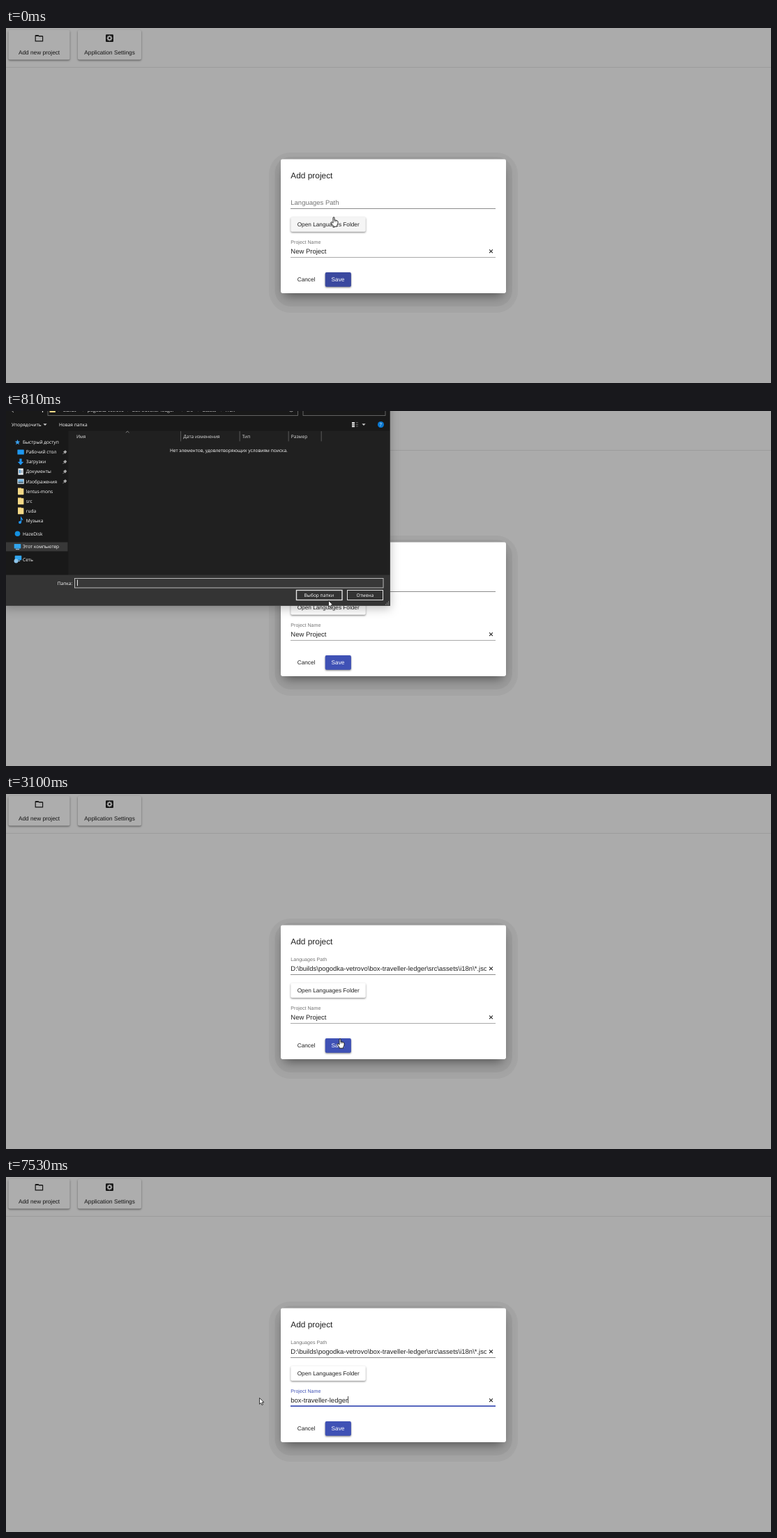
Recreate the animation shown at these times as an HTML page with a canvas. Size 1097 by 510 pixels, loop 8 s.

```html
<!DOCTYPE html>
<html lang="en">
<head>
<meta charset="utf-8">
<title>Add project</title>
<style>
html, body { margin: 0; width: 100%; height: 100%; overflow: hidden; background: #ababab; }
canvas { display: block; width: 1097px; height: 510px; }
</style>
</head>
<body>
<canvas id="stage" width="1097" height="510"></canvas>
<script>
const LOOP = 8000;
const SANS = '"Liberation Sans", Arial, sans-serif';
const UI = '"Open Sans", "Noto Sans", sans-serif';
const INK = '#212121', BLUE = '#3f51b5', GREY = '#757575';
const NAME = 'box-traveller-ledger';
const CRUMBS = ['builds', 'pogodka-vetrovo', NAME, 'src', 'assets', 'i18n'];
const PATH = 'D:\\' + CRUMBS.join('\\') + '\\*.json';

const stage = document.getElementById('stage').getContext('2d');
// The file picker is drawn apart so that it can fade and scale as one piece.
const WIN = { x: -3, y: -20, w: 554, h: 300, cx: 274, cy: 95 };
const layer = document.createElement('canvas');
layer.width = WIN.w;
layer.height = WIN.h;
const picker = layer.getContext('2d');
let g = stage;

// Step tracks: time first, then the values held from then on.
const POINTER = [
  [0, 'hand', 470, 272], [150, 'hand', 473, 274], [270, 'hand', 475, 275], [420, 'hand', 476, 276],
  [690, 'resize', 476, 282], [810, 'arrow', 462, 272], [960, 'arrow', 448, 262], [1080, 'arrow', 440, 258],
  [1200, 'arrow', 441, 260], [1350, 'arrow', 442, 262], [1470, 'arrow', 442, 263],
  [2560, 'arrow', 445, 268], [2710, 'hand', 453, 280], [2830, 'beam', 462, 318], [2980, 'hand', 479, 352],
  [3110, 'hand', 484, 355], [3260, 'hand', 482, 351], [3470, 'arrow', 470, 333],
  [3620, 'beam', 459, 321], [3740, 'beam', 440, 321], [3890, 'beam', 408, 320], [4040, 'arrow', 363, 317]
];
const WINDOW = [[0, 0, 1], [690, 0.61, 0.986], [810, 1, 1], [2140, 0.05, 0.955], [2560, 0, 1]];
const TYPED = [
  [0, 0], [4720, 1], [4870, 2], [5020, 4], [5300, 5], [5580, 7], [5730, 8], [6290, 9], [6440, 10],
  [6560, 12], [6710, 13], [6830, 14], [6980, 16], [7130, 17], [7410, 18], [7530, 20]
];
const SELECT = [[0, 459], [3740, 440], [3890, 408], [4720, 459]];

const at = (track, t) => track.filter(k => k[0] <= t).pop();

function rect(x, y, w, h, fill, r = 0) {
  g.fillStyle = fill;
  g.beginPath();
  g.roundRect(x, y, w, h, r);
  g.fill();
}

function frame(x, y, w, h, color, line = 1) {
  g.strokeStyle = color;
  g.lineWidth = line;
  g.strokeRect(x, y, w, h);
}

function dot(x, y, r, fill) {
  g.fillStyle = fill;
  g.beginPath();
  g.arc(x, y, r, 0, 7);
  g.fill();
}

function poly(points, fill, stroke, line = 1) {
  g.beginPath();
  points.forEach(([x, y], i) => i ? g.lineTo(x, y) : g.moveTo(x, y));
  if (fill) { g.closePath(); g.fillStyle = fill; g.fill(); }
  if (stroke) { g.strokeStyle = stroke; g.lineWidth = line; g.stroke(); }
}

// Text placed by its left edge and the middle of its capitals.
function text(s, x, y, size, fill = INK, font = SANS) {
  g.font = size + 'px ' + font;
  g.textRendering = 'geometricPrecision';
  g.fillStyle = fill;
  g.fillText(s, x, y + size * 0.36);
}

const label = (s, x, y, fill = '#fff') => text(s, x, y, 6.6, fill, UI);

function shadow(color, blur, dy) {
  g.shadowColor = color;
  g.shadowBlur = blur;
  g.shadowOffsetY = dy;
}

function raised(x, y, w, h, fill) {
  g.save();
  shadow('rgba(0,0,0,.45)', 2.5, 1.2);
  rect(x, y, w, h, fill, 2);
  g.restore();
}

function cross(x, y) {
  poly([[x - 2.4, y - 2.4], [x + 2.4, y + 2.4]], null, INK, 1.1);
  poly([[x + 2.4, y - 2.4], [x - 2.4, y + 2.4]], null, INK, 1.1);
}

function page() {
  rect(0, 0, 1097, 510, '#ababab');
  rect(0, 56, 1097, 1, '#9c9c9c');
  raised(3.5, 3, 88, 42.5, '#adadad');
  raised(103, 3, 91, 42.5, '#adadad');
  text('Add new project', 18, 35, 8.25, '#161616');
  text('Application Settings', 112.3, 35, 8.25, '#161616');

  poly([[42.2, 10.6], [46.2, 10.6], [47.4, 12], [52.6, 12], [52.6, 18.9], [42.2, 18.9], [42.2, 10.6]], null, '#161616', 1.2);
  poly([[42, 11.5], [52.6, 11.5]], null, '#161616', 1);

  rect(143, 9.2, 11, 10.8, '#161616', 1.3);
  for (let i = 0; i < 4; i++) {
    const a = i * Math.PI / 4, dx = 3.9 * Math.cos(a), dy = 3.9 * Math.sin(a);
    poly([[148.5 - dx, 14.6 - dy], [148.5 + dx, 14.6 + dy]], null, '#adadad', 1.5);
  }
  dot(148.5, 14.6, 3.1, '#adadad');
  dot(148.5, 14.6, 1.5, '#161616');
}

function projectName(t) {
  const focus = t >= 3620, count = at(TYPED, t)[1];
  text('Project Name', 408.3, 307, 7.12, focus ? BLUE : GREY);
  rect(408, focus ? 328.3 : 328.9, 294, focus ? 1.6 : 0.8, focus ? BLUE : '#8c8c8c');
  cross(695.5, 320.8);

  const value = count ? NAME.slice(0, count) : 'New Project';
  text(value, 408.3, 320.2, 9.5);
  const end = 408.3 + g.measureText(value).width;
  const from = at(SELECT, t)[1];
  if (from < 459) {
    g.save();
    g.beginPath();
    g.rect(from, 315, end - from, 10.5);
    g.clip();
    rect(from, 315, 60, 10.5, '#3390f5');
    text(value, 408.3, 320.2, 9.5, '#fff');
    g.restore();
  } else if (focus) {
    rect(end, 315, 0.9, 10, '#333');
  }
}

function dialog(t) {
  rect(377, 179, 357, 230, '#a4a4a4', 31);
  rect(385.5, 185, 340.5, 215, '#9c9c9c', 23);
  g.save();
  shadow('rgba(0,0,0,.5)', 16, 8);
  rect(399, 194, 313, 182, '#fff', 3);
  g.restore();
  rect(394, 188.5, 323, 192.5, '#fff', 2.4);
  text('Add project', 408.3, 212, 11.88);

  if (t >= 2140) {
    text('Languages Path', 408.3, 237.2, 7.12, GREY);
    g.save();
    g.beginPath();
    g.rect(408, 242, 281, 17);
    g.clip();
    text(PATH, 408.3, 250.3, 9.5);
    g.restore();
    cross(695.5, 250.8);
  } else {
    text('Languages Path', 408.3, 250.3, 9.5, GREY);
  }
  rect(408, 259, 294, 0.9, '#8c8c8c');

  raised(408.3, 271.5, 107.5, 21.3, t < 810 ? '#f5f5f5' : '#fff');
  text('Open Languages Folder', 417.7, 282.3, 8.25);
  projectName(t);

  text('Cancel', 417.7, 361.4, 8.25);
  raised(457.7, 351, 37.2, 20.8, t < 150 ? '#3a489f' : BLUE);
  text('Save', 466.6, 361.4, 8.25, '#fff');
}

function pin(x, y) {
  poly([[x - 3, y + 3], [x - 0.8, y + 0.8]], null, '#aaa', 0.8);
  poly([[x - 2.4, y - 0.6], [x + 0.6, y - 2.8], [x + 2.8, y - 0.6], [x + 0.4, y + 2.4]], '#aaa');
}

function folder(x, y) {
  rect(x - 4, y - 4.8, 5, 3, '#e3b95b');
  rect(x - 4, y - 4, 8.4, 9, '#f3d886', 0.6);
}

function screen(x, y) {
  rect(x - 4.8, y - 4, 9.6, 6.4, '#31a5ee', 0.6);
  rect(x - 2.6, y + 3, 5.2, 1.2, '#9fc8e4');
}

const ICONS = {
  desk: (x, y) => rect(x - 4.6, y - 3.6, 9.4, 7.2, '#1e98f0', 0.6),
  down: (x, y) => poly([[x - 1.6, y - 4.5], [x + 1.6, y - 4.5], [x + 1.6, y], [x + 4.2, y], [x, y + 4.6], [x - 4.2, y], [x - 1.6, y]], '#2196f3'),
  doc: (x, y) => {
    rect(x - 3.6, y - 4.6, 7.4, 9.2, '#e8eef2');
    rect(x - 2.2, y - 2.6, 2, 5, '#4b93c8');
    rect(x + 0.6, y - 2, 2, 4, '#9ab');
  },
  photo: (x, y) => {
    rect(x - 4.6, y - 3.6, 9.4, 7.2, '#dfe9ef');
    rect(x - 3.6, y - 2.6, 7.4, 3, '#6bb5e8');
    rect(x - 3.6, y + 0.4, 7.4, 2, '#43657a');
  },
  folder,
  note: (x, y) => {
    dot(x - 1, y + 2.6, 2, '#2196f3');
    poly([[x + 0.6, y + 2.6], [x + 0.6, y - 4.4], [x + 3, y - 0.6]], null, '#2196f3', 1.2);
  }
};

const ROWS = [
  ['Рабочий стол', 'desk'], ['Загрузки', 'down'], ['Документы', 'doc'], ['Изображения', 'photo'],
  ['lentus-mons', 'folder'], ['src', 'folder'], ['ruda', 'folder'], ['Музыка', 'note']
];

function sidebar() {
  poly(Array.from({ length: 10 }, (_, i) => {
    const r = i % 2 ? 1.7 : 4, a = i * Math.PI / 5 - Math.PI / 2;
    return [16.5 + r * Math.cos(a), 45 + r * Math.sin(a)];
  }), '#3aa0f0');
  label('Быстрый доступ', 24, 45);
  ROWS.forEach(([name, icon], i) => {
    const y = 59 + i * 14.05;
    ICONS[icon](21, y);
    label(name, 28.8, y);
    if (i < 4) pin(84.5, y);
  });
  dot(16.5, 176.3, 3.8, '#1490df');
  label('HazeDisk', 24, 176.3);
  rect(-3, 188.6, 91.5, 12.8, '#383838');
  screen(16.5, 195);
  label('Этот компьютер', 24, 195);
  screen(17.5, 211.8);
  dot(14.5, 215.6, 3, '#8cc4ea');
  label('Сеть', 24, 213.8);
}

function button(s, x, w, tx, fill, line) {
  rect(x, 257, w, 15, fill);
  frame(x + 0.5, 257.5, w - 1, 14, '#e2e2e2', line);
  label(s, tx, 264.6);
}

function drawPicker(t) {
  const ready = t >= 810;
  g = picker;
  g.setTransform(1, 0, 0, 1, -WIN.x, -WIN.y);
  rect(WIN.x, WIN.y, WIN.w, WIN.h, '#202020');
  if (ready) {
    rect(WIN.x, WIN.y, WIN.w, 48.5, '#191919');
    rect(WIN.x, 28, 92.5, 208, '#191919');
    label('Упорядочить', 8, 19.5);
    poly([[53.4, 18.2], [58.6, 18.2], [56, 21]], '#ccc');
    label('Новая папка', 76, 19.5);
    for (let i = 0; i < 3; i++) {
      rect(496, 16 + i * 2.6, 4, 2, '#ddd');
      rect(501.5, 16.4 + i * 2.6, 3.5, 0.8, '#777');
    }
    poly([[510.4, 18.2], [515.6, 18.2], [513, 21]], '#ccc');
  } else {
    rect(89.5, 28, 0.8, 208, '#555');
  }

  // address row, cut by the top edge of the stage
  frame(60, -9, 358.5, 15.5, '#6a6a6a', 0.9);
  frame(426, -9, 118, 15.5, '#6a6a6a', 0.9);
  poly([[11, -4], [7.5, -1], [11, 2]], null, '#aaa');
  poly([[52.5, 2], [52.5, -6]], null, '#ddd', 1.2);
  folder(66.5, -3);
  const stops = [82, 117, 181, 259, 282, 315];
  CRUMBS.forEach((s, i) => {
    label(s, stops[i], -1.6);
    label('›', stops[i] - 7, -1.6, '#999');
  });
  poly([[384, -3], [386.5, 0], [389, -3]], null, '#aaa', 0.8);
  g.beginPath();
  g.arc(409, -2, 3, 0, 5);
  g.stroke();

  dot(537.5, 19.5, 4.5, '#0a78d0');
  text('?', 535.8, 19.6, 7, '#fff', UI);

  label('Имя', 101, 36.3, '#e0e0e0');
  poly([[171.8, 31.2], [174.2, 29], [176.6, 31.2]], null, '#999', 0.8);
  [['Дата изменения', 250.5], ['Тип', 335], ['Размер', 405], ['', 452]].forEach(([s, x]) => {
    rect(x - 0.3, 29, 0.9, 14.5, '#606060');
    label(s, x + 3.8, 36.3, '#e0e0e0');
  });
  label('Нет элементов, удовлетворяющих условиям поиска.', 235, 57);
  sidebar();

  rect(WIN.x, 235.5, WIN.w, 45, '#343434');
  label('Папка:', 73.8, 247.5);
  rect(98, 240, 443, 14, '#383838');
  frame(98.5, 240.5, 442.5, 13.5, '#c8c8c8', 0.9);
  if (t < 1200 || (t >= 1740 && t < 2020)) rect(102, 242.4, 0.9, 8.8, '#fff');
  const hover = t >= 2020 ? '#666' : t >= 1080 ? '#454545' : '#333';
  button('Выбор папки', 416, 66.5, 427.6, hover, t < 2020 ? 1.4 : 1);
  button('Отмена', 489, 52, 502.6, '#333', 1);
  for (let i = 0; i < 3; i++)
    for (let j = 0; j <= i; j++) rect(548 - j * 2, 273.5 + i * 2, 1.1, 1.1, '#aaa');
  rect(550.3, WIN.y, 0.7, WIN.h, '#4a4a4a');
  rect(WIN.x, 279.3, WIN.w, 0.7, '#4a4a4a');
  g = stage;
}

function showPicker(t) {
  const [, alpha, scale] = at(WINDOW, t);
  if (!alpha) return;
  drawPicker(t);
  g.save();
  g.globalAlpha = alpha;
  shadow('rgba(0,0,0,.25)', 14, 4);
  g.translate(WIN.cx, WIN.cy);
  g.scale(scale, scale);
  g.drawImage(layer, WIN.x - WIN.cx, WIN.y - WIN.cy);
  g.restore();
}

const POINTERS = {
  arrow() {
    poly([[0.5, 0.4], [0.5, 9.3], [2.6, 7.4], [4, 10.6], [5.5, 9.9], [4.1, 6.8], [7, 6.7], [0.5, 0.4]], '#fff', '#111', 0.8);
  },
  hand() {
    poly([[-1, 0.3], [0, -0.3], [1, 0.3], [1, 4], [3, 4.2], [5, 4.8], [6, 6], [6, 9], [4.6, 11.5], [4.6, 13.2],
      [-1, 13.2], [-1.2, 11.6], [-4, 8], [-3.7, 6.8], [-2.6, 6.8], [-1, 8.2], [-1, 0.3]], '#fff', '#111', 0.9);
    poly([[1.2, 4], [1.2, 6.6]], null, '#111', 0.6);
    poly([[3.2, 4.6], [3.2, 6.8]], null, '#111', 0.6);
  },
  resize() {
    poly([[0, -5.5], [2.8, -2.4], [0.8, -2.4], [0.8, 2.4], [2.8, 2.4], [0, 5.5], [-2.8, 2.4], [-0.8, 2.4],
      [-0.8, -2.4], [-2.8, -2.4], [0, -5.5]], '#fff', '#222', 0.8);
  },
  beam() {
    poly([[0, -5], [0, 5]], null, '#222', 0.9);
    poly([[-2, -5], [2, -5]], null, '#222', 0.8);
    poly([[-2, 5], [2, 5]], null, '#222', 0.8);
  }
};

function pointer(t) {
  const [, kind, x, y] = at(POINTER, t);
  g.save();
  g.translate(x, y);
  POINTERS[kind]();
  g.restore();
}

function draw(now) {
  const t = now % LOOP;
  page();
  dialog(t);
  showPicker(t);
  pointer(t);
}

const start = performance.now();
function tick() {
  draw(performance.now() - start);
  requestAnimationFrame(tick);
}
tick();
</script>
</body>
</html>
```
